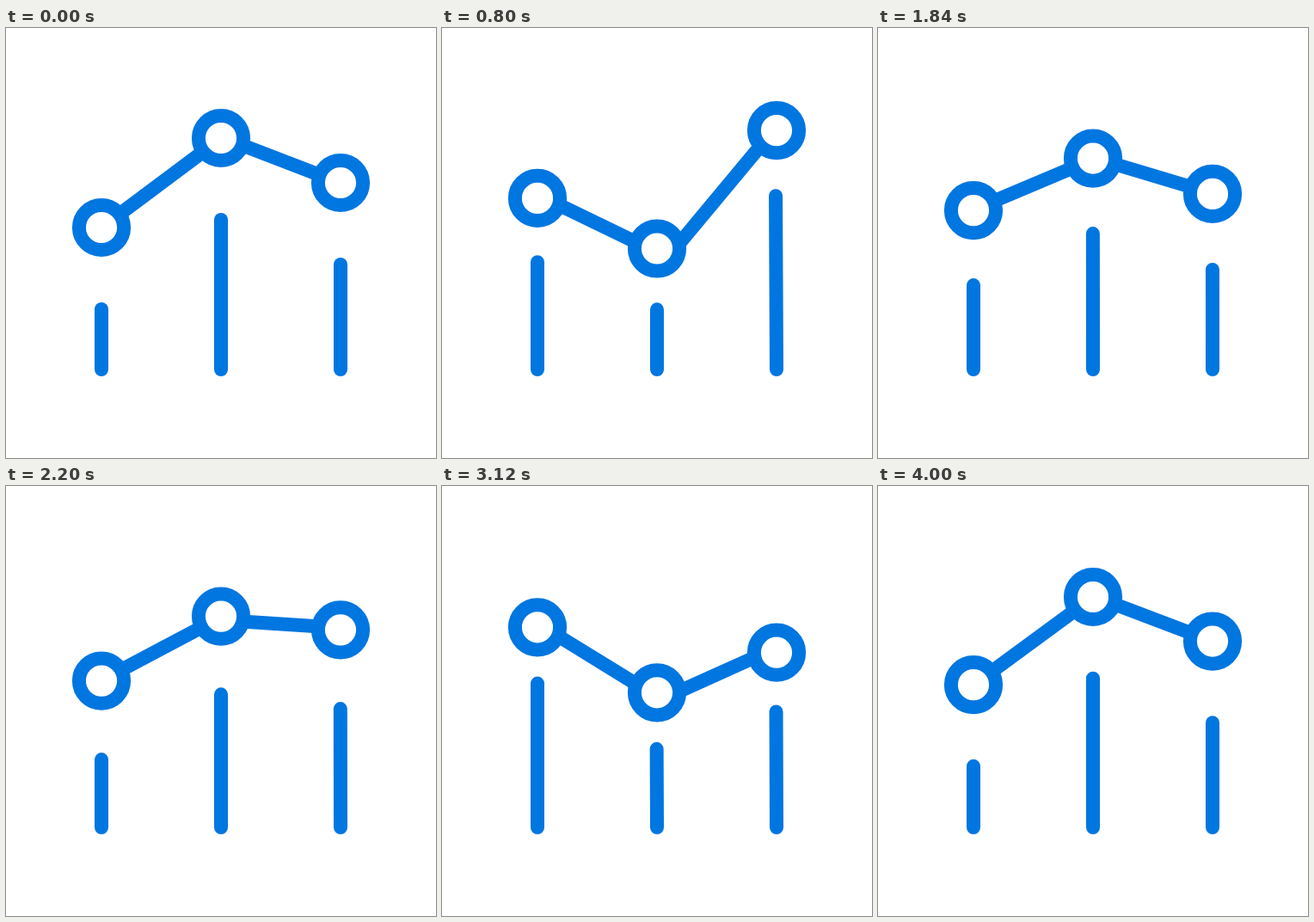
An HTML page with a canvas that plays this animation: 500 px wide and 500 px high, repeating every 4040 ms.

```html
<!DOCTYPE html>
<html lang="en">
<head>
<meta charset="utf-8">
<title>Chart loop</title>
<style>
html, body { margin: 0; width: 100%; height: 100%; overflow: hidden; background: #fff; }
canvas { display: block; }
</style>
</head>
<body>
<canvas id="stage" width="500" height="500"></canvas>
<script>
const ctx = document.getElementById('stage').getContext('2d');
const BLUE = '#0076e0', COLUMNS = [111, 250, 389], FLOOR = 397;
const LOOP = 4040, STEP = 40;

// rings: centre y; bars: top y; lean: x shift of a bar's top; links: x1, y1, x2, y2
const poses = [
  { rings: [232, 128, 180], bars: [327, 223, 275], lean: [0, 0, 0],
    links: [134, 215, 229, 144, 274, 136, 365, 171] },
  { rings: [202, 258.5, 110], bars: [277.5, 330, 187], lean: [0, 0, -1],
    links: [134, 208.5, 228, 252.5, 274, 254.5, 371, 129.5] },
  { rings: [145, 231, 236.5], bars: [205, 293.5, 301], lean: [0, -0.55, -0.2],
    links: [134, 156, 228, 221, 274, 232, 365, 232.6] }
];

// Each move runs between two ticks of a 60-tick cycle; x1 and x2 shape its easing
const moves = [
  { start: 0, end: 20, x1: 0.4, x2: 0.667 },
  { start: 20, end: 42, x1: 0.378, x2: 0.7 },
  { start: 42, end: 60, x1: 0.481, x2: 0.673 }
];

// cubic-bezier(x1, 0, x2, 1)
function ease(x, x1, x2) {
  let lo = 0, hi = 1;
  for (let i = 0; i < 24; i++) {
    const v = (lo + hi) / 2, w = 1 - v;
    if (3 * x1 * w * w * v + 3 * x2 * w * v * v + v * v * v < x) lo = v;
    else hi = v;
  }
  return lo * lo * (3 - 2 * lo);
}

function poseAt(time) {
  const shown = Math.floor(time / STEP) * STEP;
  const tick = Math.min(119, Math.round(shown * 0.02997)) % 60;
  const i = moves.findIndex(m => tick < m.end);
  const { start, end, x1, x2 } = moves[i];
  const k = ease((tick - start) / (end - start), x1, x2);
  const from = poses[i], to = poses[(i + 1) % poses.length];
  const mix = key => from[key].map((a, j) => a + (to[key][j] - a) * k);
  return { rings: mix('rings'), bars: mix('bars'), lean: mix('lean'), links: mix('links') };
}

function line(x1, y1, x2, y2, cap) {
  ctx.lineCap = cap;
  ctx.beginPath();
  ctx.moveTo(x1, y1);
  ctx.lineTo(x2, y2);
  ctx.stroke();
}

function draw(now) {
  const { rings, bars, lean, links } = poseAt(now % LOOP);
  ctx.fillStyle = '#fff';
  ctx.fillRect(0, 0, 500, 500);
  ctx.strokeStyle = BLUE;
  ctx.lineWidth = 16;
  line(...links.slice(0, 4), 'butt');
  line(...links.slice(4), 'butt');
  COLUMNS.forEach((x, i) => {
    line(x + lean[i], bars[i], x, FLOOR, 'round');
    ctx.beginPath();
    ctx.arc(x, rings[i], 26.1, 0, Math.PI * 2);
    ctx.fill();
    ctx.stroke();
  });
}

const begin = performance.now();
function frame() {
  draw(performance.now() - begin);
  requestAnimationFrame(frame);
}
frame();
</script>
</body>
</html>
```
